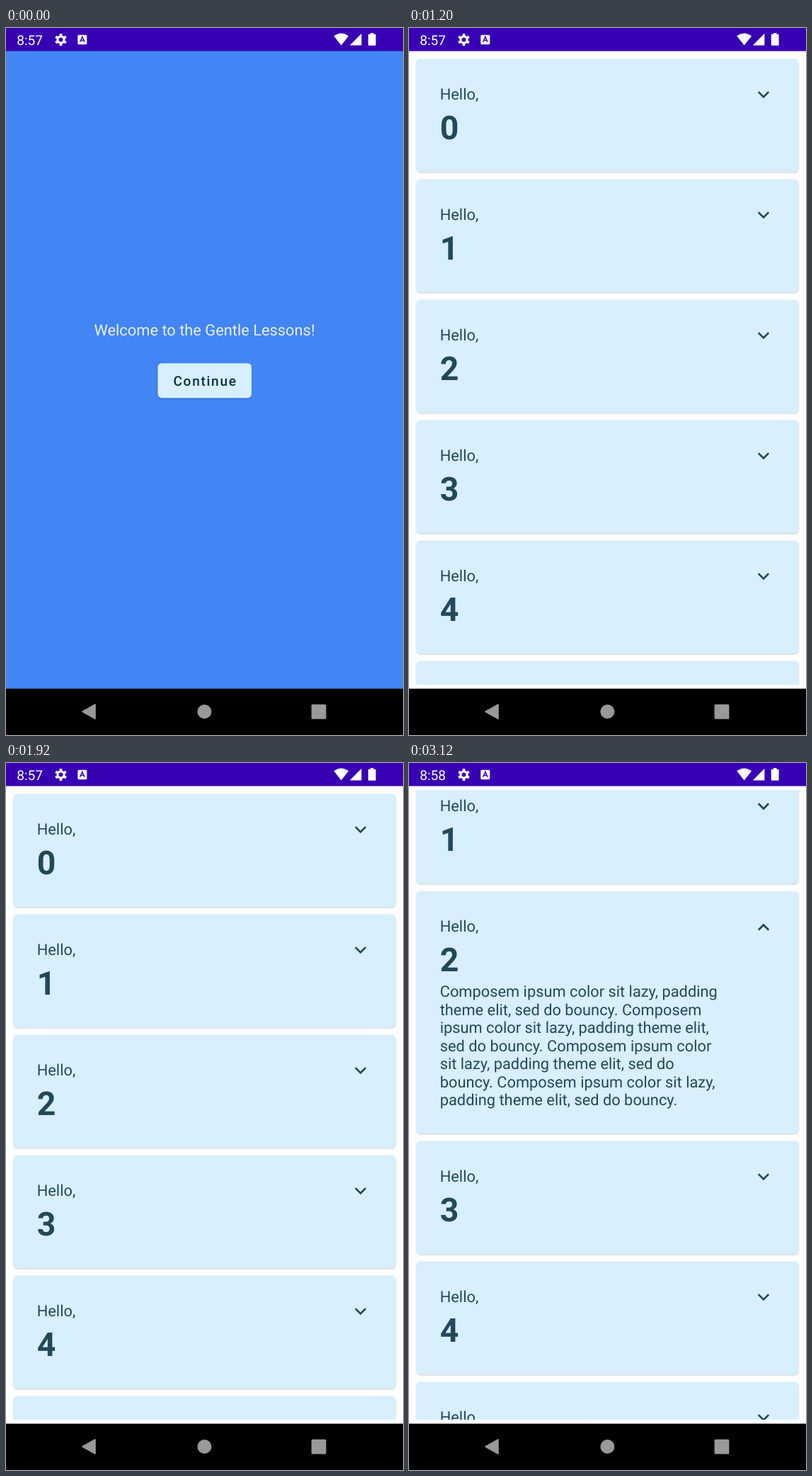
An HTML page for the animation above (3.6 s loop, 561 px wide and 998 px high).

```html
<!DOCTYPE html>
<html lang="en">
<head>
<meta charset="utf-8">
<style>
  html, body { margin: 0; width: 100%; height: 100%; overflow: hidden; background: #000; }
  svg { display: block; width: 100vw; height: 100vh; }
  text { font: 21.84px Roboto, sans-serif; text-rendering: geometricPrecision; }
  .ink { fill: #22495b; }
  .number { font-size: 46.4px; font-weight: 700; }
  .button { font-size: 19.1px; font-weight: 500; letter-spacing: 1.706px; fill: #073042; }
  .clock { font-size: 19.1px; }
  .surface { fill: #d7efff; filter: drop-shadow(0 1px 1px rgba(0, 0, 0, .2)); }
</style>
</head>
<body>
<svg viewBox="0 0 561 998">
  <defs>
    <clipPath id="viewport"><rect y="38.2" width="561" height="888.8"/></clipPath>
    <path id="chevron" class="ink" d="M6.26-5.06 0 1.19-6.26-5.06-8.18-3.14 0 5.05 8.18-3.14z"/>
  </defs>
  <rect width="561" height="998" fill="#fff"/>

  <g class="screen">
    <rect y="32" width="561" height="901" fill="#4285f4"/>
    <text x="280.5" y="434" text-anchor="middle" fill="#fff" fill-opacity=".87">Welcome to the Gentle Lessons!</text>
    <rect class="surface" x="214.5" y="473.2" width="132.5" height="49" rx="5.4"/>
    <text class="button" x="236.4" y="505.3">Continue</text>
  </g>
  <g class="screen" clip-path="url(#viewport)"></g>
  <g class="screen" clip-path="url(#viewport)"></g>

  <rect width="561" height="32.6" fill="#3700b3"/>
  <g fill="#fff">
    <text id="clock" class="clock" x="15.2" y="23.8"></text>
    <g fill="none" stroke="#fff" transform="translate(77.5 16.5)">
      <circle r="4.6" stroke-width="3.2"/>
      <circle r="7.1" stroke-width="2.8" pathLength="12" stroke-dasharray="1 1" stroke-dashoffset="-.5"/>
    </g>
    <rect x="101.3" y="9.8" width="13" height="13.4" rx="1.6"/>
    <path d="M104.6 19.8 107.8 12.4 111 19.8M105.8 17.4h4" fill="none" stroke="#3700b3" stroke-width="1.5"/>
    <path d="M473.7 24.4 463.3 11.3Q473.7 3.6 484.1 11.3z"/>
    <path d="M485.8 24.4 502.4 7.8v16.6z"/>
    <path d="M515 7h4.4v1.7h2.2q1 0 1 1v14q0 1-1 1h-8.8q-1 0-1-1v-14q0-1 1-1h2.2z"/>
  </g>

  <rect y="932.6" width="561" height="66" fill="#000"/>
  <g fill="#999">
    <path d="M108 965 126 955v20z" stroke="#999" stroke-width="1.6" stroke-linejoin="round"/>
    <circle cx="280.4" cy="965" r="10"/>
    <rect x="431.6" y="954.8" width="20.8" height="20.8" rx="1.5"/>
  </g>
</svg>
<script>
const HOLD = 1200, PITCH = 170, CARD_HEIGHT = 159.4, LINE_HEIGHT = 25.5;
const screens = document.querySelectorAll('.screen');
const clock = document.getElementById('clock');

const details = [
  'Composem ipsum color sit lazy, padding',
  'theme elit, sed do bouncy. Composem',
  'ipsum color sit lazy, padding theme elit,',
  'sed do bouncy. Composem ipsum color',
  'sit lazy, padding theme elit, sed do',
  'bouncy. Composem ipsum color sit lazy,',
  'padding theme elit, sed do bouncy.'
];

function card(number, top, lines = []) {
  const height = CARD_HEIGHT + (lines.length && 182.4);
  const body = lines.map((line, i) =>
    `<text class="ink" x="43.7" y="${287 - 138 + i * LINE_HEIGHT}">${line}</text>`).join('');
  return `<g transform="translate(0 ${top})">
    <rect class="surface" x="10.7" width="539.8" height="${height}" rx="5.4"/>
    <text class="ink" x="43.7" y="57.3">Hello,</text>
    <text class="ink number" x="43.7" y="113">${number}</text>
    <use href="#chevron" transform="translate(501 50.4) scale(1 ${lines.length ? -1 : 1})"/>
    ${body}</g>`;
}

const cards = (first, last, top) =>
  Array.from({ length: last - first + 1 }, (_, i) => card(first + i, top + i * PITCH)).join('');

screens[1].innerHTML = cards(0, 5, 43.8);
screens[2].innerHTML = cards(1, 1, 11) + card(2, 181.2, details) + cards(3, 5, 533.8);

function draw(now) {
  const current = Math.floor(now / HOLD) % screens.length;
  screens.forEach((screen, i) => screen.style.display = i === current ? '' : 'none');
  clock.textContent = current === 2 ? '8:58' : '8:57';
  requestAnimationFrame(draw);
}
draw(performance.now());
</script>
</body>
</html>
```
